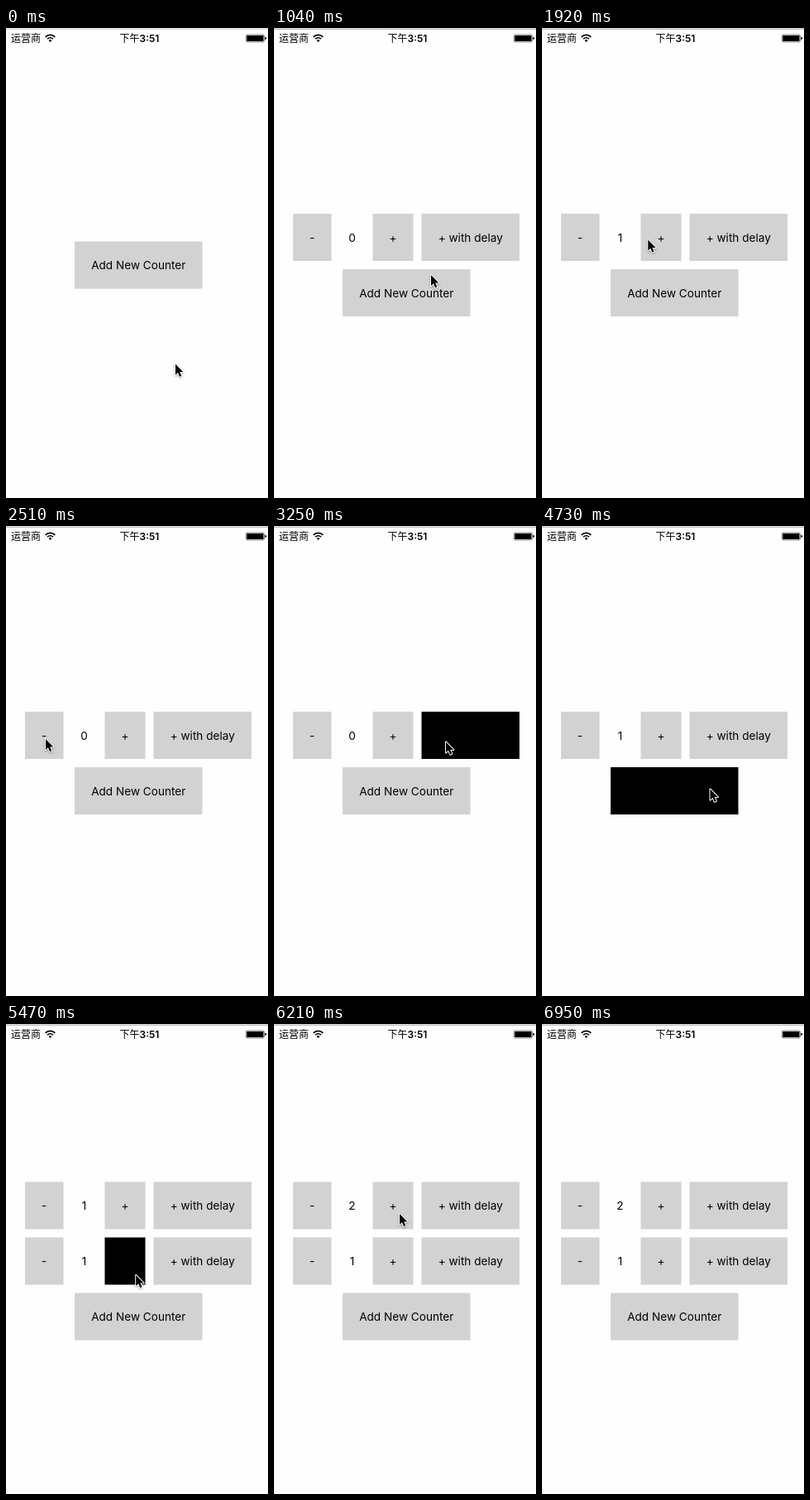
These frames come from a looping animation (317x567 px, 7090 ms). An HTML page:

```html
<!DOCTYPE html>
<html lang="zh">
<head>
<meta charset="utf-8">
<title>Counters</title>
<style>
  html, body { margin: 0; width: 100%; height: 100%; overflow: hidden; background: #fefefe; }
  svg { display: block; width: 100%; height: 100%; }
  text { font-family: Inter, "Noto Sans CJK SC", "Noto Sans CJK", sans-serif; }
  .label { font-size: 13.6px; text-anchor: middle; }
  .status { font-size: 12px; }
  .clock { font-weight: 500; }
  .clock tspan { font-weight: 600; }
  #cursor { filter: drop-shadow(0 1px 1px rgba(0, 0, 0, .35)); }
</style>
</head>
<body>
<svg viewBox="0 0 317 567">
  <rect width="317" height="567" fill="#fefefe"/>
  <rect id="edge" y=".5" width="317" height="1.5"/>
  <text class="status" x="6" y="16.5">运营商</text>
  <g fill="none" stroke="#000" stroke-width="1.7">
    <path d="M47.7 10.9a8 8 0 0 1 11.6 0M50 13.2a4.9 4.9 0 0 1 7 0"/>
    <path d="M51.6 14.9a2.7 2.7 0 0 1 3.8 0L53.5 17z" fill="#000" stroke="none"/>
  </g>
  <text class="status clock" x="137.5" y="16.5">下午<tspan>3:51</tspan></text>
  <rect x="290.4" y="8" width="22" height="9" rx="1.5" fill="none" stroke="#000" stroke-opacity=".6" stroke-width=".8"/>
  <rect x="291.3" y="8.9" width="20.2" height="7.2" rx=".7"/>
  <path d="M313.3 10.8q1.8 .3 1.8 1.7t-1.8 1.7z"/>
  <g id="app"></g>
  <path id="cursor" d="M0 0V13l3-2.8 2.1 5 2.2-.9-2.1-4.9h4.2z" stroke="#fff" stroke-width="2" stroke-linejoin="round" paint-order="stroke"/>
</svg>
<script>
// The screen refreshes in ticks, 48 to a loop.
const LOOP = 7090, TICKS = 48, TICK = LOOP / TICKS;
const HOLD = 2, GLIDE = 4, DELAY = 6;
const ROW_STEP = 67, HEIGHT = 57, MIDDLE = 286;

const home = { x: 205, y: 405.5 };
const presses = [
  { tick: 5, key: "add", x: 190, y: 298 },
  { tick: 11, key: "+", row: 0, x: 128.3, y: 255.5 },
  { tick: 15, key: "-", row: 0, x: 48, y: 257 },
  { tick: 21, key: "delay", row: 0, x: 208, y: 260.5 },
  { tick: 32, key: "add", x: 203.5, y: 317.5 },
  { tick: 36, key: "+", row: 1, x: 157.2, y: 303 },
  { tick: 40, key: "+", row: 0, x: 152, y: 229 }
];
const exit = { tick: TICKS, x: 256, y: 590 };

const app = document.getElementById("app");
const cursor = document.getElementById("cursor");
const edge = document.getElementById("edge");

const ease = p => (1 - Math.cos(Math.PI * p)) / 2;

// After each release the pointer glides to the next press and rests there.
function pointer(tick) {
  let from = home, left = 0;
  for (const to of [...presses, exit]) {
    const span = Math.min(GLIDE, to.tick - left);
    if (tick < to.tick + HOLD) {
      const p = ease(Math.min(1, (tick - left) / span));
      return [from.x + (to.x - from.x) * p, from.y + (to.y - from.y) * p];
    }
    from = to;
    left = to.tick + HOLD;
  }
}

// A press takes effect one tick in; a delayed one well after its release.
function counters(tick) {
  const values = [];
  for (const { tick: start, key, row } of presses) {
    const due = start + (key === "delay" ? HOLD + DELAY : 1);
    if (tick < due) continue;
    if (key === "add") values.push(0);
    else values[row] += key === "-" ? -1 : 1;
  }
  return values;
}

const label = (x, y, text) => `<text class="label" x="${x}" y="${y + 33.8}">${text}</text>`;

function button(x, y, width, text, pressed) {
  const box = `<rect x="${x}" y="${y}" width="${width}" height="${HEIGHT}" fill="${pressed ? "#000" : "#d2d2d2"}"/>`;
  return box + label(x + width / 2, y, text);
}

function view(tick) {
  const values = counters(tick);
  const held = presses.find(p => tick >= p.tick && tick < p.tick + HOLD);
  const isHeld = (key, row) => held?.key === key && held.row === row;
  const top = MIDDLE - (HEIGHT + values.length * ROW_STEP) / 2;
  const rows = values.map((value, i) => {
    const y = top + i * ROW_STEP;
    return button(23, y, 46.5, "-", isHeld("-", i))
      + label(94.5, y, value)
      + button(119.5, y, 49, "+", isHeld("+", i))
      + button(178.5, y, 118.5, "+ with delay", isHeld("delay", i));
  });
  return rows.join("") + button(83, top + values.length * ROW_STEP, 154.5, "Add New Counter", isHeld("add"));
}

let shown;
const start = performance.now();

function draw() {
  const t = (performance.now() - start) % LOOP;
  const tick = Math.floor((t + 10) / TICK) % TICKS;
  if (tick !== shown) {
    shown = tick;
    app.innerHTML = view(tick);
    cursor.setAttribute("transform", `translate(${pointer(tick)})`);
    edge.setAttribute("fill", tick < 3 ? "#dadada" : "#bebebe");
  }
  requestAnimationFrame(draw);
}
draw();
</script>
</body>
</html>
```
